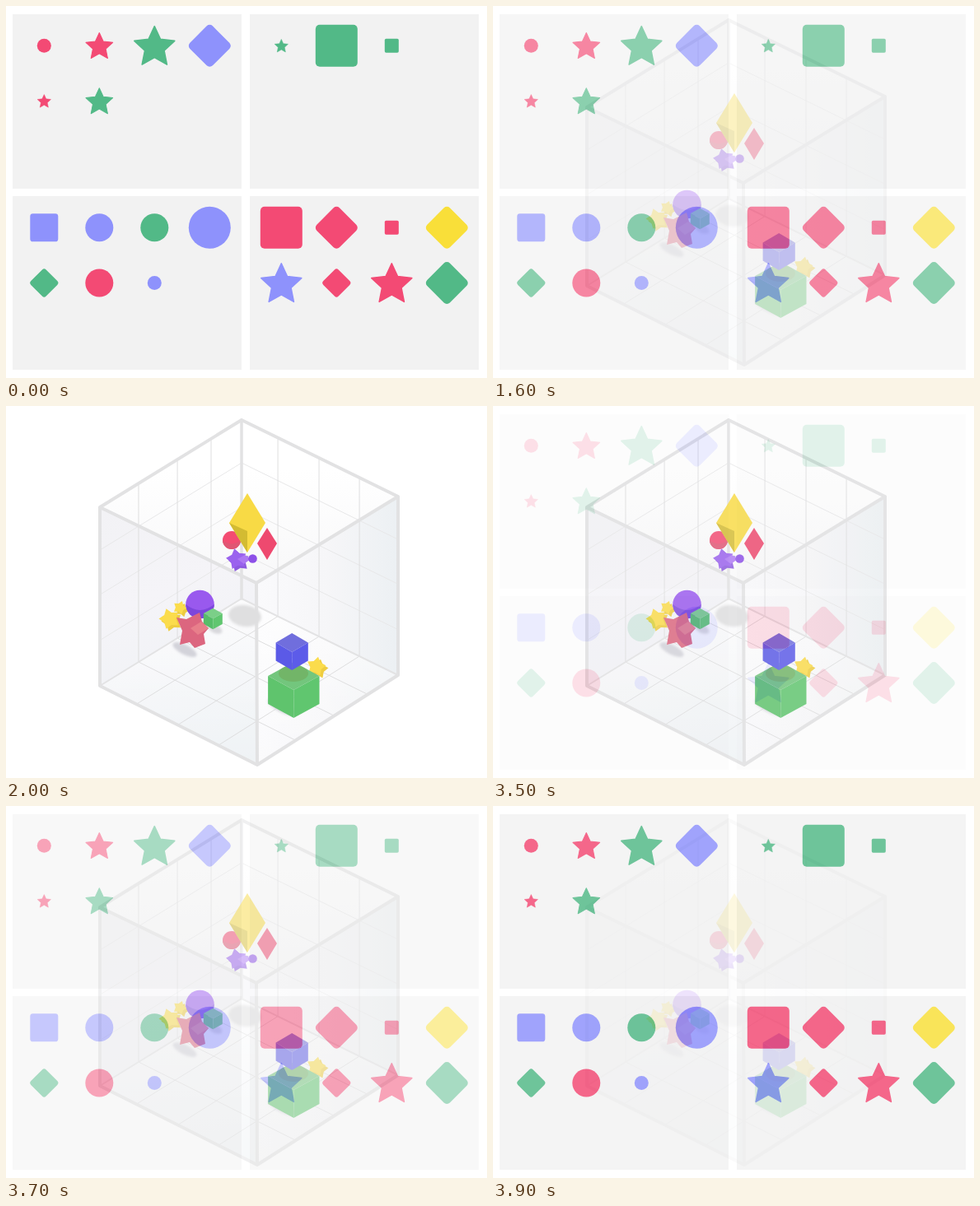
Animation of 584 by 452 pixels, one loop 4000 ms. Source, as an HTML page:

```html
<!DOCTYPE html>
<html lang="en">
<head>
<meta charset="utf-8">
<title>Shapes crossfade</title>
<style>
  html, body { margin: 0; width: 100%; height: 100%; overflow: hidden; background: #fff; }
  svg { display: block; }
</style>
</head>
<body>
<svg width="584" height="452" viewBox="0 0 584 452">
  <defs>
    <linearGradient id="leftFace" x1="0" y1="0" x2="0.25" y2="1">
      <stop offset="0" stop-color="#f2f2f5"/>
      <stop offset=".4" stop-color="#f5f4f8"/>
      <stop offset="1" stop-color="#edf1f4"/>
    </linearGradient>
    <linearGradient id="rightFace" x1="0" y1="0" x2="1" y2="0">
      <stop offset="0" stop-color="#fafafc"/>
      <stop offset=".5" stop-color="#f6f6f8"/>
      <stop offset="1" stop-color="#ecf0f3"/>
    </linearGradient>
    <linearGradient id="backWall" x1="0" y1="0" x2="0" y2="1">
      <stop offset=".3" stop-color="#fff"/>
      <stop offset="1" stop-color="#f8f8f9"/>
    </linearGradient>
    <linearGradient id="floor" x1="0" y1="0" x2="0" y2="1">
      <stop offset="0" stop-color="#fff" stop-opacity=".7"/>
      <stop offset="1" stop-color="#fff" stop-opacity=".1"/>
    </linearGradient>
    <filter id="soft" x="-30%" y="-30%" width="160%" height="160%"><feGaussianBlur stdDeviation="1.5"/></filter>
  </defs>
  <g id="room"></g>
  <g id="board"></g>
</svg>
<script>
const room = document.getElementById('room');
const board = document.getElementById('board');
const RED = '#f34a74', GREEN = '#52b987', BLUE = '#8e92fc', YELLOW = '#f9df39';

const poly = (points, fill, extra = '') => `<polygon points="${points.join(' ')}" fill="${fill}" ${extra}/>`;
const circle = (x, y, r, fill) => `<circle cx="${x}" cy="${y}" r="${r}" fill="${fill}"/>`;
const rect = (x, y, w, h, fill, extra = '') =>
  `<rect x="${x}" y="${y}" width="${w}" height="${h}" fill="${fill}" ${extra}/>`;
const path = (d, color, width) =>
  `<path d="${d}" fill="none" stroke="${color}" stroke-width="${width}" stroke-linecap="round" stroke-linejoin="round"/>`;
const shadow = (x, y, rx, ry, angle, fill) =>
  `<ellipse rx="${rx}" ry="${ry}" fill="${fill}" filter="url(#soft)" transform="translate(${x} ${y}) rotate(${angle})"/>`;

function starPoints(x, y, radius, inner, turn = 0) {
  return Array.from({ length: 10 }, (_, i) => {
    const r = i % 2 ? radius * inner : radius;
    const a = (i * 36 - 90 + turn) * Math.PI / 180;
    return [x + r * Math.cos(a), y + r * Math.sin(a)];
  });
}

// Flat shapes, each fitting a box of the given size
const flat = {
  circle: (x, y, size, color) => circle(x, y, size / 2, color),
  square: (x, y, size, color) =>
    rect(x - size / 2, y - size / 2, size, size, color, `rx="${size * .1}"`),
  diamond: (x, y, size, color) => {
    const side = size * .765;
    return rect(x - side / 2, y - side / 2, side, side, color,
      `rx="${size * .1}" transform="rotate(45 ${x} ${y})"`);
  },
  star: (x, y, size, color) =>
    poly(starPoints(x, y + size * .04, size * .505, .48), color,
      `stroke="${color}" stroke-width="${size * .03}" stroke-linejoin="round"`)
};

const SMALL = 17, MEDIUM = 34, LARGE = 51;
const panels = [
  { x: 8, y: 10, height: 212, items: [
    ['circle', SMALL, RED], ['star', MEDIUM, RED], ['star', LARGE, GREEN], ['diamond', LARGE, BLUE],
    ['star', SMALL, RED], ['star', MEDIUM, GREEN]] },
  { x: 296, y: 10, height: 212, items: [
    ['star', SMALL, GREEN], ['square', LARGE, GREEN], ['square', SMALL, GREEN]] },
  { x: 8, y: 231, height: 211, items: [
    ['square', MEDIUM, BLUE], ['circle', MEDIUM, BLUE], ['circle', MEDIUM, GREEN], ['circle', LARGE, BLUE],
    ['diamond', MEDIUM, GREEN], ['circle', MEDIUM, RED], ['circle', SMALL, BLUE]] },
  { x: 296, y: 231, height: 211, items: [
    ['square', LARGE, RED], ['diamond', LARGE, RED], ['square', SMALL, RED], ['diamond', LARGE, YELLOW],
    ['star', LARGE, BLUE], ['diamond', MEDIUM, RED], ['star', LARGE, RED], ['diamond', LARGE, GREEN]] }
];

function drawBoard() {
  return rect(0, 0, 584, 452, '#fff') + panels.map(({ x, y, height, items }) =>
    rect(x, y, 278, height, '#f2f2f2') + items.map(([kind, size, color], i) =>
      flat[kind](x + 38.3 + (i % 4) * 67, y + 38.3 + Math.floor(i / 4) * 67.2, size, color)
    ).join('')).join('');
}

// Corners of the glass room
const backTop = [286, 17], backLow = [286, 234];
const leftTop = [114, 123], leftLow = [114, 340];
const rightTop = [476, 110], rightLow = [476, 327];
const frontTop = [304, 215], frontLow = [305, 436];

const mix = (a, b, k) => a.map((v, i) => v + (b[i] - v) * k);
const line = (...points) => 'M' + points.join('L');

function drawRoom() {
  const grid = [];
  for (const k of [.215, .453, .727]) {
    const low = mix(backLow, leftLow, k);
    grid.push(line(mix(backTop, leftTop, k), low, mix(rightLow, frontLow, k)));
  }
  for (const k of [.232, .495, .753]) {
    const low = mix(backLow, rightLow, k);
    grid.push(line(mix(backTop, rightTop, k), low, mix(leftLow, frontLow, k)));
  }
  const rings = [.24, .49, .745].map(k =>
    line(mix(leftTop, leftLow, k), mix(backTop, backLow, k), mix(rightTop, rightLow, k)));

  return poly([backTop, rightTop, frontTop, leftTop], 'url(#backWall)')
    + poly([leftTop, frontTop, frontLow, leftLow], 'url(#leftFace)')
    + poly([rightTop, frontTop, frontLow, rightLow], 'url(#rightFace)')
    + poly([backLow, rightLow, frontLow, leftLow], 'url(#floor)')
    + path(rings.join(''), '#e8e8e9', 1)
    + path(grid.join(''), '#dededf', 1)
    + path(line(leftLow, backLow, rightLow), '#e3e3e4', 2)
    + path(line(backTop, backLow), '#e2e2e3', 3.5)
    + path(line(leftTop, backTop, rightTop, rightLow, frontLow, leftLow) + 'Z'
      + line(leftTop, frontTop, rightTop) + line(frontTop, frontLow), '#e2e2e3', 4);
}

function cube(x, y, half, rise, height, top, left, right) {
  const center = [x, y + rise];
  const west = [x - half, y], east = [x + half, y];
  const down = ([px, py]) => [px, py + height];
  return poly([[x, y - rise], east, center, west], top)
    + poly([west, center, down(center), down(west)], left)
    + poly([center, east, down(east), down(center)], right);
}

const solidStar = (x, y, r, turn, face, side) =>
  poly(starPoints(x + 2, y + 2, r, .6, turn), side) + poly(starPoints(x - 1, y - 1, r, .6, turn), face);

function ball(x, y, r, color, shade) {
  return circle(x, y, r, color)
    + `<path d="M${x - r} ${y}A${r} ${r} 0 0 0 ${x + r} ${y}Q${x} ${y + r * .8} ${x - r} ${y}Z" fill="${shade}"/>`;
}

function drawSolids() {
  return shadow(290, 255, 20, 13, 8, '#dfdfe0')
    + shadow(217, 296, 16, 6, 27, '#d3d3da')
    + shadow(254, 271, 9, 5, 25, '#d8d8dc')
    + shadow(335, 366, 19, 6, 27, '#d3d3da')
    // Upper group
    + ball(274, 163, 11, '#f34c72', '#e05674')
    + poly([[317, 148], [329, 167], [317, 187], [305, 167]], '#ee496f')
    + poly([[293, 106], [315, 142], [293, 178], [271, 142]], '#f8da45')
    + poly([[271, 142], [293, 152], [293, 178]], '#d3bb32')
    + solidStar(281, 187, 13, -12, '#9a62ee', '#8d5bdf')
    + poly([[281, 186], [290, 181], [297, 186], [289, 192]], '#ad78f3')
    + circle(299.5, 185.5, 5.3, '#8d50e8')
    // Left group
    + solidStar(212, 246, 8.5, 20, '#fbdc4c', '#eccb40')
    + solidStar(199.5, 259.5, 13, -18, '#fbdc4c', '#efcd40')
    + ball(235.5, 241, 17.3, '#9959ee', '#7d46dc')
    + cube(251.3, 252, 11.5, 6.3, 13, '#7bcf88', '#57bd69', '#60c66f')
    + poly([[207, 257], [219, 259], [235, 251], [238, 262], [246, 270], [240, 277],
      [242, 289], [229, 294], [223, 287], [211, 290], [214, 273]], '#dc667f')
    + poly([[224, 270], [237, 262], [246, 270], [233, 278]], '#e87f8b')
    // Right group
    + solidStar(377.5, 317.5, 12, 12, '#fbdc4c', '#efcd40')
    + cube(349.3, 328, 31.2, 17, 34, '#73c67d', '#5fc46d', '#60c66f')
    + `<ellipse cx="349" cy="325" rx="18" ry="10" fill="#72b568"/>`
    + cube(347.2, 287.5, 19.6, 11.5, 22, '#706edd', '#5b5ae7', '#5c5be9');
}

room.innerHTML = drawRoom() + drawSolids();
board.innerHTML = drawBoard();

// Fades advance in 100 ms steps of one sixth
function boardOpacity(time) {
  const steps = start => Math.max(0, Math.min(6, Math.floor((time - start) / 100) + 1));
  return (6 - steps(1500) + steps(3500)) / 6;
}

function frame() {
  board.setAttribute('opacity', boardOpacity(performance.now() % 4000));
  requestAnimationFrame(frame);
}
frame();
</script>
</body>
</html>
```
